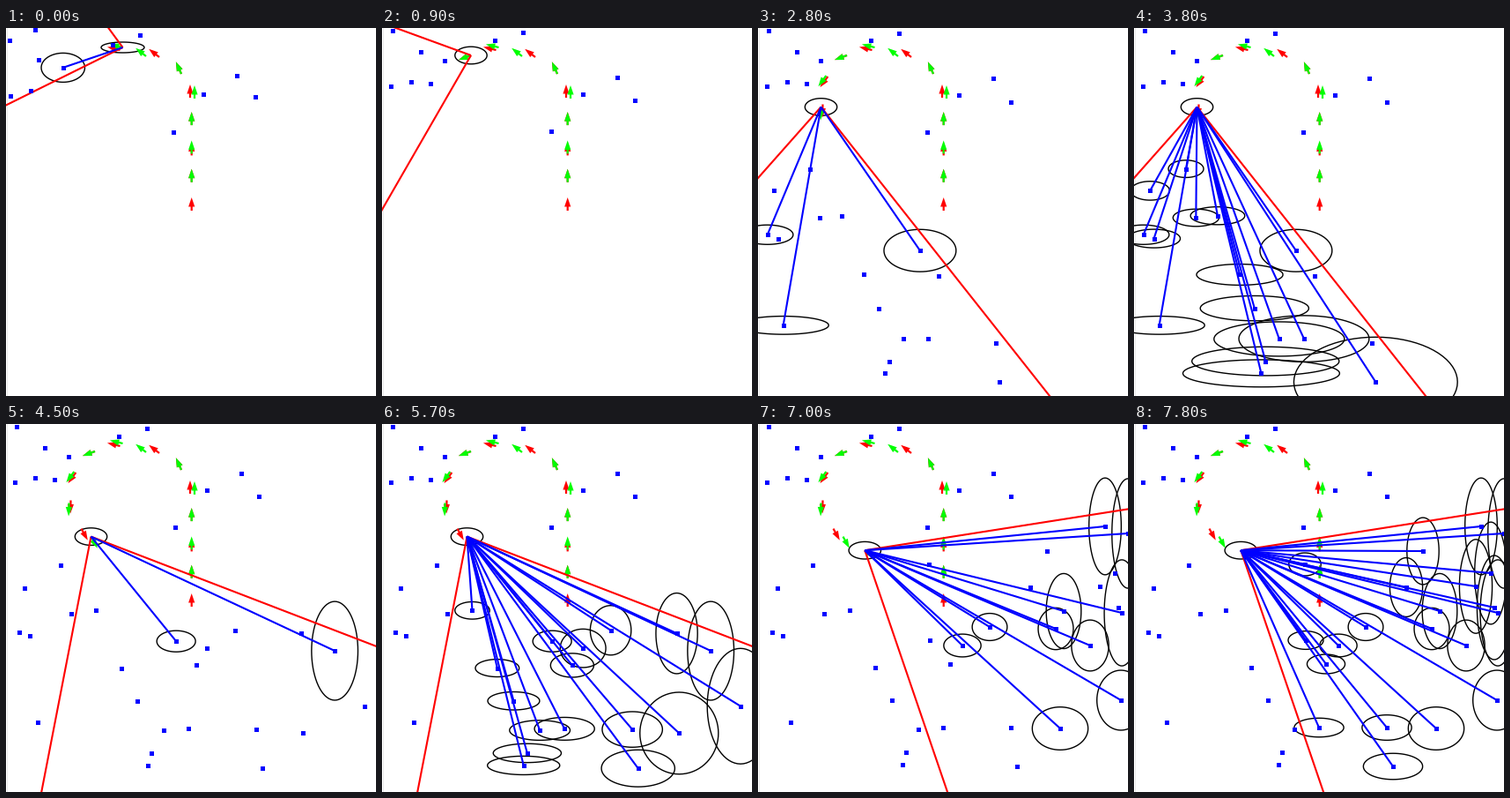
These frames come from a looping animation (420 by 417 pixels, 8000 ms). A matplotlib script:

```python
import numpy as np
import matplotlib.pyplot as plt
from matplotlib.animation import FuncAnimation
from matplotlib.collections import LineCollection, PolyCollection

W, H, DPI = 420, 417, 64
FRAMES, STEP = 80, 100
PX = 72 / DPI
RED, LIME, BLUE = "#ff0000", "#00ff00", "#0000ff"
HALF_VIEW = 40     # degrees either side of the heading
GUESS_ERROR = 4    # heading error before a correction
WALKED = 8         # poses already on the trail at the first stop

# Estimated walk (x, y, heading in degrees, y down): straight up, then a left turn
PATH = [(210.7, 207 - 32.3 * i, 270) for i in range(4)] + [
    (214, 80, 270), (199, 52, 246), (159, 32, 218), (132.5, 22, 193.7),
    (101, 31, 160), (77.3, 54, 126.1), (71.5, 89.5, 91.6), (96.5, 127.6, 61),
    (121.3, 143.2, 31.1)]
# Where the true pose parts from the estimate
OFFSET = {2: (0, 2), 4: (-5, -1), 6: (15, 1), 7: (-3, 3), 9: (2, 1),
          10: (2, -3), 11: (-11, -9)}

# Landmarks, grouped by the stop that first finds them
FOUND = [
    [(12, 3), (160, 5), (128, 14), (44, 27), (71, 37), (10, 66), (33, 61),
     (267, 56), (287, 82), (228, 75), (192, 117), (42, -7)],
    [(55, 63)],
    [(62, 160), (22, 186), (75, 215), (16, 236), (28, 240), (37, 338)],
    [(104, 211), (133, 276), (152, 313), (182, 346), (210, 344), (168, 372),
     (164, 386), (195, 245), (218, 272), (287, 344), (294, 388)],
    [(232, 251), (263, 230), (338, 232), (377, 251), (343, 345), (412, 313)],
    [(328, 144), (194, 159), (309, 185), (347, 212), (388, 184), (405, 169),
     (409, 208), (413, 214), (394, 116), (420, 124)]]
WORLD = np.array([p for group in FOUND for p in group], float)
BORN = np.repeat(range(len(FOUND)), [len(group) for group in FOUND])


class Stop:
    """A pose of the robot: map estimate, and sightings with their ticks."""

    def __init__(self, k, move, fix, settle, end, swing, blur, lead,
                 pivot=(75, 60), radii=(18.2, 9.8)):
        self.move, self.fix, self.radii = move, fix, radii
        x, y, self.heading = PATH[WALKED - 1 + k]
        self.at = np.array((x, y))

        # The map is swung about a pivot; older landmarks are better known
        age = k - BORN[BORN <= k]
        known = WORLD[:len(age)]
        dx, dy = (known - pivot).T
        a = swing * 0.5 ** age
        self.marks = known + np.column_stack([-a * dy, a * dx])

        # Uncertainty grows with distance, shrinks with repeated sightings
        away = self.marks - self.at
        spread = 0.021 * blur * np.abs(away[:, ::-1]) ** 1.4
        spread *= (1.0 + age[:, None]) ** np.array([-0.45, -0.86])
        self.rings = np.hypot(radii, spread)

        # The leads come first, the rest from the middle of the view outward
        bearing = np.degrees(np.arctan2(away[:, 1], away[:, 0]))
        off = np.abs((bearing - self.heading + 180) % 360 - 180)
        rest = [i for i in np.argsort(off)
                if off[i] <= HALF_VIEW and i not in lead]
        beats = [t for t in range(settle + 2, end) if t % 3 != 1]
        rest = rest[:2 * len(beats)]
        ticks = np.linspace(fix, settle, len(lead)).astype(int)
        self.sightings = list(zip(ticks, lead)) + [
            (beats[j * len(beats) // len(rest)], i) for j, i in enumerate(rest)]


STOPS = [
    Stop(0, 0, 0, 0, 5, -0.053, 2, [4], pivot=(220, 155), radii=(24.5, 6)),
    Stop(1, 5, 8, 8, 15, 0, 2, []),
    Stop(2, 15, 16, 19, 24, 0.015, 2.6, [16, 17, 18]),
    Stop(3, 24, 26, 28, 41, 0.06, 1.4, [16, 18, 26]),
    Stop(4, 41, 42, 45, 59, 0.02, 1, [26, 33]),
    Stop(5, 59, 61, 64, FRAMES, 0, 1, [44, 45, 39, 33]),
]

TURN = np.linspace(0, 2 * np.pi, 73)
ARROW = np.array([(0, -1.1), (4.5, -1.1), (4.5, -3.6), (15, 0), (4.5, 3.6),
                  (4.5, 1.1), (0, 1.1)])
SQUARE = np.array([(-2, -2), (3, -2), (3, 3), (-2, 3)])


def ring(center, radii):
    return center + radii * np.column_stack([np.cos(TURN), np.sin(TURN)])


def unit(deg):
    return np.array([np.cos(np.radians(deg)), np.sin(np.radians(deg))])


def arrow(x, y, deg, shift=(0, 0)):
    c, s = unit(deg)
    return ARROW @ np.array([(c, s), (-s, c)]) + (x, y) + np.array(shift)


EST_ARROWS = [arrow(*p) for p in PATH]
TRUE_ARROWS = [arrow(*p, OFFSET.get(i, (0, 0))) for i, p in enumerate(PATH)]

fig = plt.figure(figsize=(W / DPI, H / DPI), dpi=DPI, facecolor="white")
ax = fig.add_axes([0, 0, 1, 1])
ax.set_xlim(0, W)
ax.set_ylim(H, 0)
ax.axis("off")
ax.axvline(0.5, color="#ebebeb", lw=PX, zorder=0)


def lines(color, width, z):
    return ax.add_collection(
        LineCollection([], colors=color, linewidths=width * PX, zorder=z),
        autolim=False)


def shapes(color, z, smooth=True):
    return ax.add_collection(
        PolyCollection([], facecolors=color, edgecolors="none",
                       antialiaseds=smooth, zorder=z), autolim=False)


rings = lines("black", 1.4, 1)
true_arrows = shapes(RED, 2)
est_arrows = shapes(LIME, 3)
view = lines(RED, 2.1, 4)
rays = lines(BLUE, 2.1, 5)
dots = shapes(BLUE, 6, False)
ARTISTS = [rings, true_arrows, est_arrows, view, rays, dots]


def draw(tick):
    k = max(i for i, s in enumerate(STOPS) if s.move <= tick)
    now = STOPS[k]
    fixed = tick >= now.fix
    marks = now.marks if fixed else STOPS[k - 1].marks
    heading = now.heading + (0 if fixed else GUESS_ERROR)
    seen = [i for t, i in now.sightings if t <= tick]

    rings.set_segments([ring(now.at, now.radii)]
                       + [ring(marks[i], now.rings[i]) for i in seen])
    rays.set_segments([[now.at, marks[i]] for i in seen])
    view.set_segments([[now.at, now.at + 700 * unit(heading + d)]
                       for d in (-HALF_VIEW, HALF_VIEW)])
    dots.set_verts([SQUARE + np.round(m) for m in marks])
    true_arrows.set_verts(TRUE_ARROWS[:WALKED + k])
    est_arrows.set_verts(EST_ARROWS[1:WALKED + k])
    return ARTISTS


anim = FuncAnimation(fig, draw, frames=FRAMES, interval=STEP, repeat=True,
                     repeat_delay=0, blit=False)
plt.show()
```
